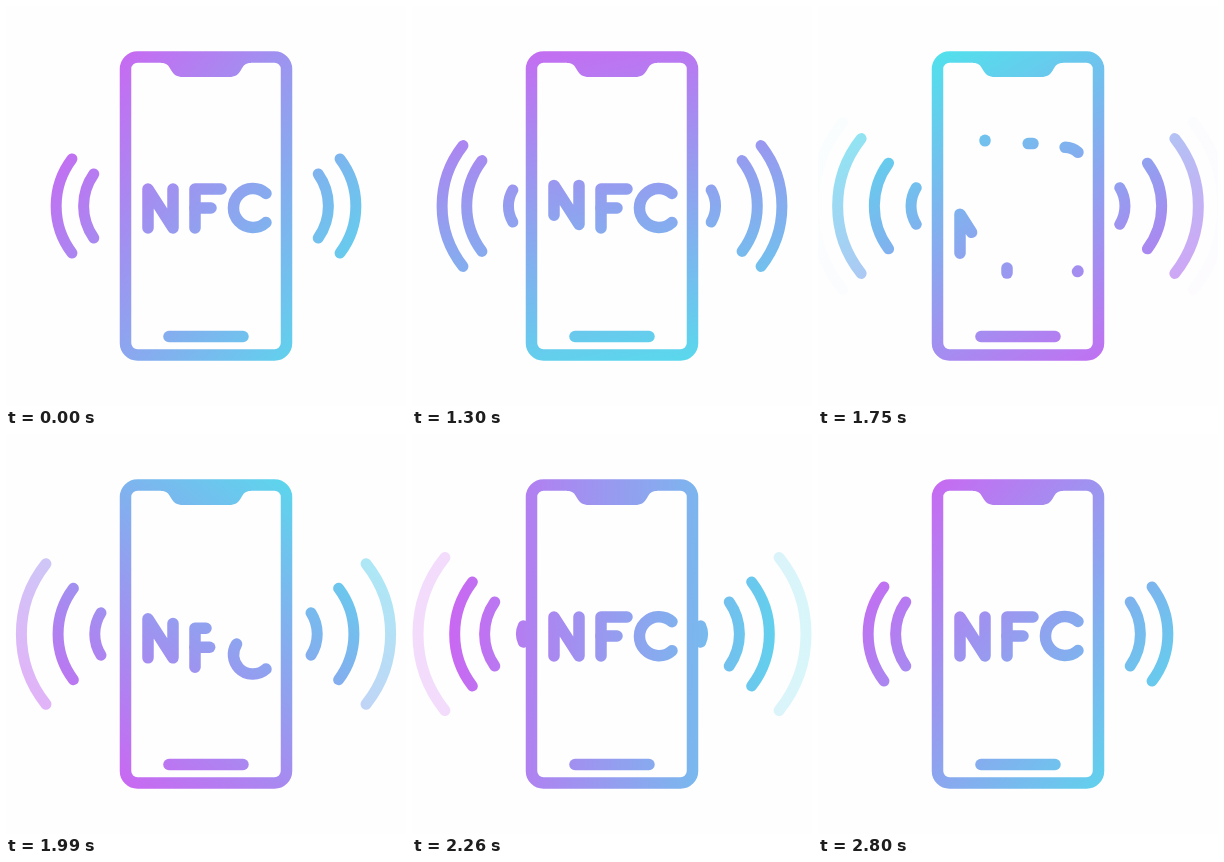
Animation of 400 by 400 pixels, one loop 2830 ms. Source, as an HTML page with a canvas:

```html
<!DOCTYPE html>
<html>
<head>
<meta charset="utf-8">
<title>NFC phone</title>
<style>
  html, body { margin: 0; height: 100%; overflow: hidden; background: #fefefe; }
  canvas { display: block; width: 100vw; height: 100vh; }
</style>
</head>
<body>
<canvas width="400" height="400"></canvas>
<script>
const ctx = document.querySelector('canvas').getContext('2d');
const LOOP = 2830, START = 1030, END = 2800;
const PAPER = '#fefefe', PURPLE = '#cb66f2', CYAN = '#4fe3ec';

const clamp = v => Math.min(1, Math.max(0, v));
const progress = (t, from, to) => clamp((t - from) / (to - from));
const easeOut = v => 1 - (1 - v) ** 3;

// Cubic bezier easing with control points (x1, 0) and (x2, 1)
function ease(x, x1, x2) {
  let lo = 0, hi = 1;
  for (let i = 0; i < 24; i++) {
    const u = (lo + hi) / 2, v = 1 - u;
    if (3 * u * v * v * x1 + 3 * u * u * v * x2 + u ** 3 < x) lo = u; else hi = u;
  }
  return lo * lo * (3 - 2 * lo);
}

// Each letter leaves upwards at `out` and comes back from below at `back`
const LETTERS = [
  { d: 'M142 222V183L167 222V183', len: 124.3, out: 1216, back: 1525 },
  { d: 'M189 222V183H215', len: 65, out: 1325, back: 1663 },
  { d: 'M189 202H205', len: 16, out: 1325, back: 1663, bar: true },
  { d: 'M260 216.5A19.5 19.5 0 1 1 260 187.5', len: 89.6, out: 1387, back: 1722 }
];
const TRAVEL = 575, SHIFT = 49;

const notch = new Path2D('M155 51V57C161 57 162 59 165 64S171 71 177 71H223' +
  'C229 71 232 69 235 64S239 57 245 57V51Z');

// The gradient turns once around a point right of the middle
function gradient(t) {
  const turn = ease(progress(t, START, END), 0.26, 0.4);
  const a = (218 + 360 * turn) * Math.PI / 180;
  const x = 195 * Math.cos(a), y = 195 * Math.sin(a);
  const g = ctx.createLinearGradient(228 + x, 200 + y, 228 - x, 200 - y);
  g.addColorStop(0, PURPLE);
  g.addColorStop(1, CYAN);
  return g;
}

// A pair of mirrored arcs; h is half their height, dx pulls them to the middle
function wave(h, dx = 0) {
  if (h <= 0 || h >= 86) return;
  const r = (h + 5) / 0.668, a = Math.asin(h / r);
  ctx.globalAlpha = clamp((86 - h) / 24) ** 1.6;
  ctx.beginPath();
  ctx.arc(128 + dx, 200, r, Math.PI - a, Math.PI + a);
  ctx.moveTo(272 - dx + r * Math.cos(a), 200 - h);
  ctx.arc(272 - dx, 200, r, -a, a);
  ctx.stroke();
  ctx.globalAlpha = 1;
}

function waves(t) {
  const go = Math.max(0, t - START);
  const grow = 29.5 * (go / 480) ** 1.38;
  wave(47 + grow);
  wave(32 + grow, 5 * (1 - clamp(go / 480)));
  for (let i = 0; i < 4; i++) wave(0.114 * (t - 1160 - 215 * i));
  const inner = easeOut(progress(t, 2205, END));
  wave(47 * easeOut(progress(t, 2011, END)));
  wave(32 * inner, 5 * inner);
}

// Strokes the part of a letter between the fractions a and b
function part({ d, len }, a, b, y) {
  if (b - a < 0.001) return;
  const path = new Path2D();
  path.addPath(new Path2D(d), { e: 0, f: y });
  ctx.setLineDash(b - a > 0.999 ? [] : [len * (b - a), 999]);
  ctx.lineDashOffset = -len * a;
  ctx.stroke(path);
  ctx.setLineDash([]);
}

function letter(l, t) {
  const gone = ease(progress(t, l.out, l.out + TRAVEL), 0.333, 0.4);
  const shown = ease(progress(t, l.back, l.back + TRAVEL), 0.333, 0.4);
  part(l, l.bar ? clamp(gone * 3) : gone, 1, -SHIFT * gone);
  part(l, 0, l.bar ? clamp((shown - 0.5) * 3.4) : shown, SHIFT * (1 - shown));
}

function phone() {
  ctx.beginPath();
  ctx.roundRect(119.5, 51, 161, 298, 12);
  ctx.fillStyle = PAPER;
  ctx.fill();
  ctx.stroke();
  ctx.fillStyle = ctx.strokeStyle;
  ctx.fill(notch);
  ctx.beginPath();
  ctx.moveTo(163, 330.5);
  ctx.lineTo(237, 330.5);
  ctx.stroke();
}

function draw() {
  const t = performance.now() % LOOP;
  ctx.fillStyle = PAPER;
  ctx.fillRect(0, 0, 400, 400);
  ctx.strokeStyle = gradient(t);
  ctx.lineCap = ctx.lineJoin = 'round';
  ctx.lineWidth = 11;
  waves(t);
  ctx.lineWidth = 11.5;
  phone();
  LETTERS.forEach(l => letter(l, t));
  requestAnimationFrame(draw);
}
draw();
</script>
</body>
</html>
```
